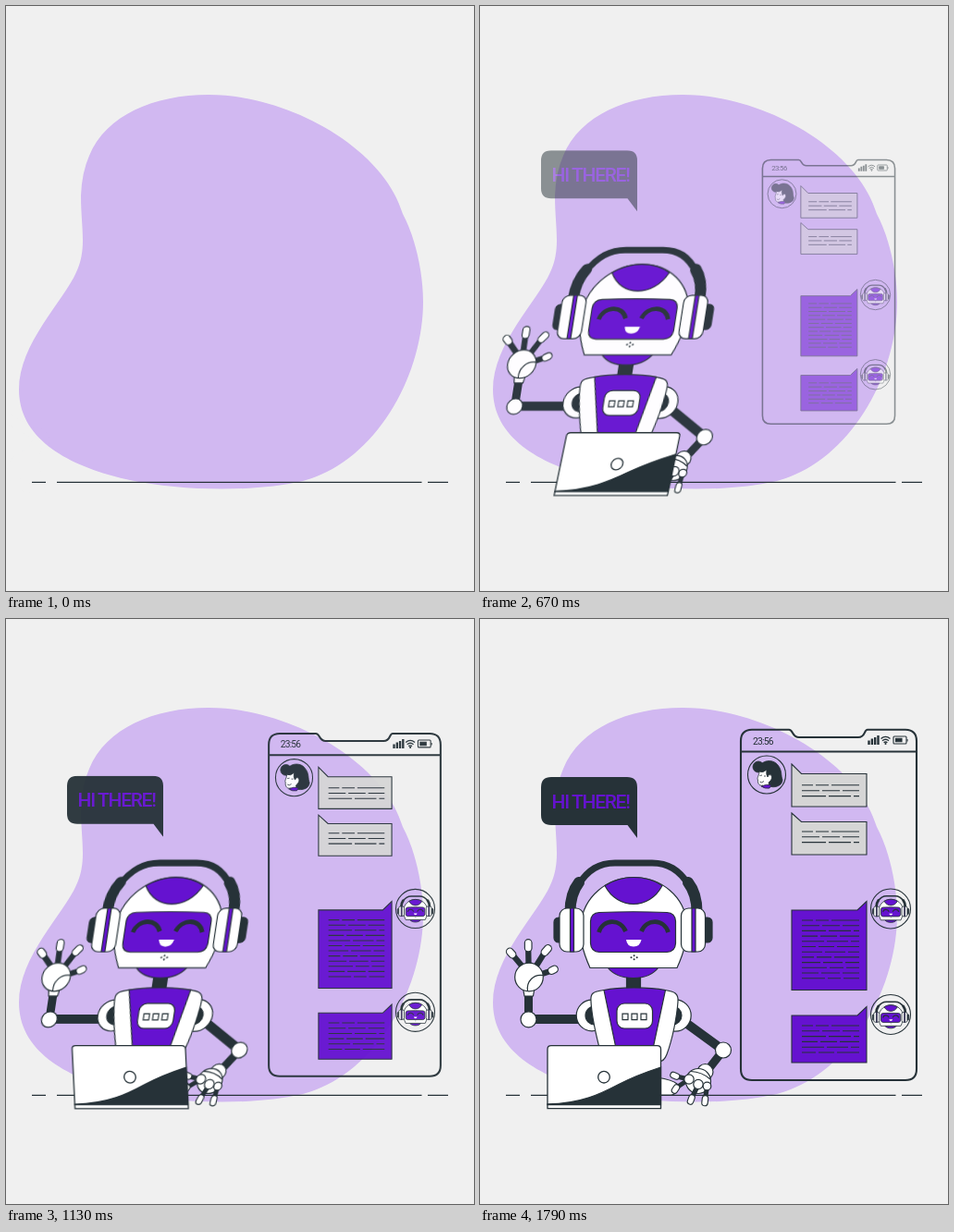
An HTML page for the animation above (1.83 s loop, 506 by 633 pixels).

```html
<!DOCTYPE html>
<html lang="en">
<head>
<meta charset="utf-8">
<title>Chat robot</title>
<style>
  html, body { margin: 0; width: 100%; height: 100%; overflow: hidden; background: #f0f0f0; }
  svg { display: block; width: 100vw; height: 100vh; }
  .ink { stroke: #263238; }
  .w { fill: #fff; }
  .p { fill: #6512d0; }
  .d { fill: #263238; }
  .g { fill: #d5d5d5; }
  .n { fill: none; }
  text { font-family: Roboto, "Liberation Sans", sans-serif; stroke: none; }
  .time { font-size: 10.4px; letter-spacing: -.8px; }
  .hello { font-size: 21px; font-weight: 500; letter-spacing: -1.3px; text-anchor: middle; }
  #robot { transform-origin: 0 396px; }
  #laptop { transform-origin: 0 496px; }
  #phone { transform-origin: 377px 309.5px; }
</style>
</head>
<body>
<svg viewBox="0 0 506 633">
  <path fill="#d1b8f1" d="M90 162C108 118 160 96 219 96C305 96 408 153 429 225C441 247 451 285 451 320C451 400 400 493 321 514C270 526 190 525 134 513C70 499 14 470 14 415C14 365 62 320 76 288C88 262 81 240 81 205Q82 180 90 162Z"/>
  <path class="ink" stroke-width="1.2" d="M28 515.3H43M55 515.3H449.5M456 515.3H478"/>

  <g id="phone" class="ink" stroke-width="1.1">
    <path class="n" stroke-width="2.1" d="M294 119.800H334C339 119.800 337 128 345 128H409C417 128 415 119.800 419 119.800H460Q472 120 472 132V487Q472 499 460 499H294Q282 499 282 487V132Q282 120 294 119.800ZM282 143.500H472"/>
    <text class="d time" x="295" y="135.500">23:56</text>
    <path class="n" stroke-width="2.4" d="M420.500 136V131.500M423.900 136V129.500M427.200 136V128M430.500 136V126"/>
    <path class="n" stroke-width="1.3" d="M433.500 129.500Q438.500 125.200 443.500 129.500M435 131.700Q438.500 128.800 442 131.700M436.600 133.700Q438.500 132.300 440.400 133.700"/>
    <circle class="d" cx="438.500" cy="135" r=".5"/>
    <rect class="n" x="447" y="127" width="14" height="8" rx="1"/>
    <path class="d" d="M449.500 129.300H456V132.800H449.500ZM462 130V132.500"/>

    <circle class="n" cx="310" cy="168.500" r="20.500"/>
    <g stroke-width=".8">
      <circle class="d" cx="301" cy="160" r="6"/>
      <path class="d" d="M301 163C303 152 317 151 322 158C327 164 325 169 327 174C327 182 315 184 309 179Z"/>
      <path class="w" d="M302 165C302 169 299 172 300.500 174C300 179 303 181 306 180L306 182H313L312 177Q317 173 315 169Q312 167 311 171Q309 168 310 163Q306 167 302 165Z"/>
      <path class="n" d="M302.500 169.500L305 169M307 170L309 170M302.500 176Q304.500 178 307 175.500"/>
      <path class="p" d="M304 181Q310 178 315 180L313 183Q308 184 304 181Z"/>
    </g>
    <path class="g" d="M337 157L347.500 167.500H418V203H337Z"/>
    <path class="g" d="M337 210L347.500 219.500H418V255H337Z"/>
    <path class="p" d="M418 305.500V401.500H337V315H408Z"/>
    <path class="p" d="M418 419.500V480H337V429H408Z"/>
    <path id="lines" class="n"/>
    <circle class="n" cx="444" cy="313.500" r="21.500"/>
    <circle class="n" cx="444" cy="428" r="21.500"/>
    <use href="#head" stroke-width="3.600" transform="translate(406 239) scale(.23)"/>
    <use href="#head" stroke-width="3.600" transform="translate(406 353.500) scale(.23)"/>
  </g>

  <g id="bubble">
    <path class="d" d="M77 171H159Q170 171 170 182V237L159.500 223H77Q66 223 66 212V182Q66 171 77 171Z"/>
    <text class="p hello" x="119.500" y="204.500">HI THERE!</text>
  </g>

  <g id="robot" class="ink" stroke-width="1.2">
    <path class="w" d="M150 494C180 494 205 496 213 503C216 509 212 515 206 515H150Z"/>
    <ellipse class="p" cx="166" cy="500" rx="22" ry="12"/>
    <rect class="d" x="156" y="474" width="20" height="21"/>

    <path class="n" stroke-width="10" d="M52.500 433H108M213 430L263 466.500"/>
    <path class="n" stroke-width="9" d="M52.500 433V402M262 468L244 491"/>
    <circle class="w" cx="121" cy="429" r="16.800"/>
    <circle class="w" cx="211" cy="429" r="17.200"/>
    <circle class="d" cx="124" cy="429" r="10"/>
    <circle class="d" cx="208" cy="429" r="10"/>
    <circle class="w" cx="52.500" cy="433.300" r="8.500"/>
    <circle class="w" cx="263" cy="466.500" r="8.500"/>

    <path class="w" d="M46.500 399H59L57.500 408H48Z"/>
    <g id="wave"></g>
    <circle class="w" cx="53" cy="387.500" r="15.300"/>
    <path class="n" d="M51.500 402.500C50 392 58 384 68 385.500"/>

    <circle class="w" cx="243.500" cy="490" r="8.500"/>
    <circle class="w" cx="236" cy="500" r="13.500"/>
    <path class="n" d="M228 489.500Q240 490 249 498"/>
    <g id="rest"></g>
    <circle class="w" cx="226" cy="498" r="5.200"/>
    <circle class="w" cx="236" cy="503.500" r="5.200"/>
    <circle class="w" cx="245.500" cy="505.500" r="4.300"/>

    <rect class="d" x="158.500" y="384" width="15" height="18"/>
    <path class="w" d="M134 401.500C122 403 119 405 120 414C121 435 127 455 131 472Q133 479 140 479H193Q199 479 202 471C208 455 213 430 214 414C215 405 210 403 200 401.500Z"/>
    <path class="p" d="M134 401.500C150 398 183 398 200.500 401.500L184 479H150Z"/>
    <rect class="w" x="148" y="416" width="38.500" height="27" rx="8"/>
    <path class="n" d="M154 427.200h6v6.500h-6zM164 427.200h6v6.500h-6zM174 427.200h6v6.500h-6z"/>

    <g id="head">
      <path class="p" d="M138 377C144 385 155 388.500 166 388.500S187 385 193 377Z"/>
      <rect class="d" x="80" y="323" width="14" height="27" rx="5"/>
      <rect class="d" x="237" y="323" width="14" height="27" rx="5"/>
      <path class="n" stroke-width="7" d="M106 288C117 271 129 264 146 264H186C203 264 215 271 226 288"/>
      <path class="n" stroke-width="12" stroke-linecap="round" d="M97.500 317C97.500 303 100 294 107 285M234.500 317C234.500 303 232 294 225 285"/>
      <path class="w" d="M119 377.500C112 362 107 345 109 330C112 300 138 279.500 166 279.500C196 279.500 221 300 224 330C225 345 220 362 213 377.500Z"/>
      <path class="p" d="M135 288.500C144 283 155 279.500 166 279.500S189 283 197 288.500C190 302 178 308.500 166 308.500S142 302 135 288.500Z"/>
      <path class="p" d="M129 317.500Q166 316 202 317.500Q211 318 211.500 327V351Q211 360 202 360.500H129Q120 360 119.500 351V327Q120 318 129 317.500Z"/>
      <path class="n" stroke-width="4.800" d="M128.500 339C133 324 152 324 157.500 338M174.500 338C180 324 199 324 203.500 339"/>
      <path class="w" stroke="none" d="M158 347H174.500Q173 354.500 166 354.500T158 347Z"/>
      <g class="d" stroke="none">
        <circle cx="163.500" cy="366.300" r="1"/><circle cx="169.700" cy="366.300" r="1"/>
        <circle cx="166.600" cy="364.300" r="1"/><circle cx="166.600" cy="368.300" r="1"/>
      </g>
      <rect class="w" x="86" y="313" width="26" height="47" rx="8"/>
      <rect class="w" x="217.500" y="313" width="26" height="47" rx="8"/>
      <path class="p" d="M97.500 313h4v47h-4zM229 313h4v47h-4z"/>
    </g>
  </g>

  <g id="laptop" class="ink" stroke-width="1.3">
    <path class="w" d="M73 529.700V465.500Q73 461.700 77 461.700H191.500Q195.500 461.700 195.500 465.500V529.700Z"/>
    <path class="d" d="M73 525C110 524 130 514 150 503.500Q168 494 195.500 485V525.500H73Z"/>
    <circle class="w" cx="134" cy="495.700" r="6.300"/>
  </g>
</svg>
<script>
const FRAMES = 44, STEP = 1000 / 24, LOOP = 1830, SPAN = 1000;
const EASE = 'cubic-bezier(.36,-.01,.5,1.38)';
const $ = id => document.getElementById(id);

// Fingers: dark link x1,y1 to x2,y2, then a white tip to x3,y3.
function fingers(id, list, width) {
  const line = (a, b, c, d, w, color) =>
    `<path d="M${a} ${b}L${c} ${d}" stroke="${color}" stroke-width="${w}" stroke-linecap="round"/>`;
  $(id).innerHTML = list.map(([a, b, c, d, e, f]) =>
    line(a, b, c, d, width - 1.5, '#263238') +
    line(c, d, e, f, width + 1, '#263238') +
    line(c, d, e, f, width - 1.3, '#fff')).join('');
}
fingers('wave', [
  [45, 375, 35, 363, 32.3, 360], [52.5, 373, 52.2, 356, 52.2, 350.5],
  [61, 375, 70, 360.5, 73.5, 356.5], [67, 384, 77.5, 380.5, 80.5, 379]
], 7.8);
fingers('rest', [
  [226, 498, 212.5, 495, 209, 493.5], [226, 498, 212.5, 507, 210.5, 510],
  [236, 504, 229, 518, 227.5, 522], [245.5, 506, 243.5, 519, 243, 523.5]
], 6.6);

// Broken text lines inside the messages: first y, gap, count.
let rows = '';
for (const [y, gap, count] of [[179.8, 5.9, 3], [230, 5.8, 3], [326, 5.7, 12], [440, 5.8, 6]]) {
  for (let i = 0; i < count; i++) {
    const a = 360 + i * 7 % 16, b = a + 17 + i * 5 % 11, h = y + i * gap;
    rows += `M348 ${h}H${a}M${a + 3} ${h}H${b}M${b + 3} ${h}H410`;
  }
}
$('lines').setAttribute('d', rows);

const dash = [
  { transform: 'translateX(-253px) skewX(20deg)', opacity: 0 },
  { transform: 'translateX(0px) skewX(-10deg)', opacity: 1, offset: .6 },
  { transform: 'translateX(0px) skewX(2deg)', opacity: 1, offset: .8 },
  { transform: 'translateX(0px) skewX(0deg)', opacity: 1 }
];
const zoom = [{ transform: 'scale(.5)', opacity: 0 }, { transform: 'scale(1)', opacity: 1 }];
const drop = [{ transform: 'translateY(-30px)', opacity: 0 }, { transform: 'translateY(0px)', opacity: 1 }];

const parts = [['robot', dash, 1], ['laptop', dash, 5 / 6], ['phone', zoom, 1], ['bubble', drop, 1]]
  .map(([id, keys, length]) => {
    const steps = keys.map(key => ({ ...key, easing: EASE }));
    const anim = $(id).animate(steps, { duration: SPAN * length, fill: 'both' });
    anim.pause();
    return anim;
  });

const start = performance.now();
function draw() {
  const t = (performance.now() - start) % LOOP;
  const frame = Math.min(FRAMES - 1, Math.floor((t + 5) / STEP));
  for (const anim of parts) anim.currentTime = (frame + 1) / FRAMES * SPAN;
  requestAnimationFrame(draw);
}
draw();
</script>
</body>
</html>
```
